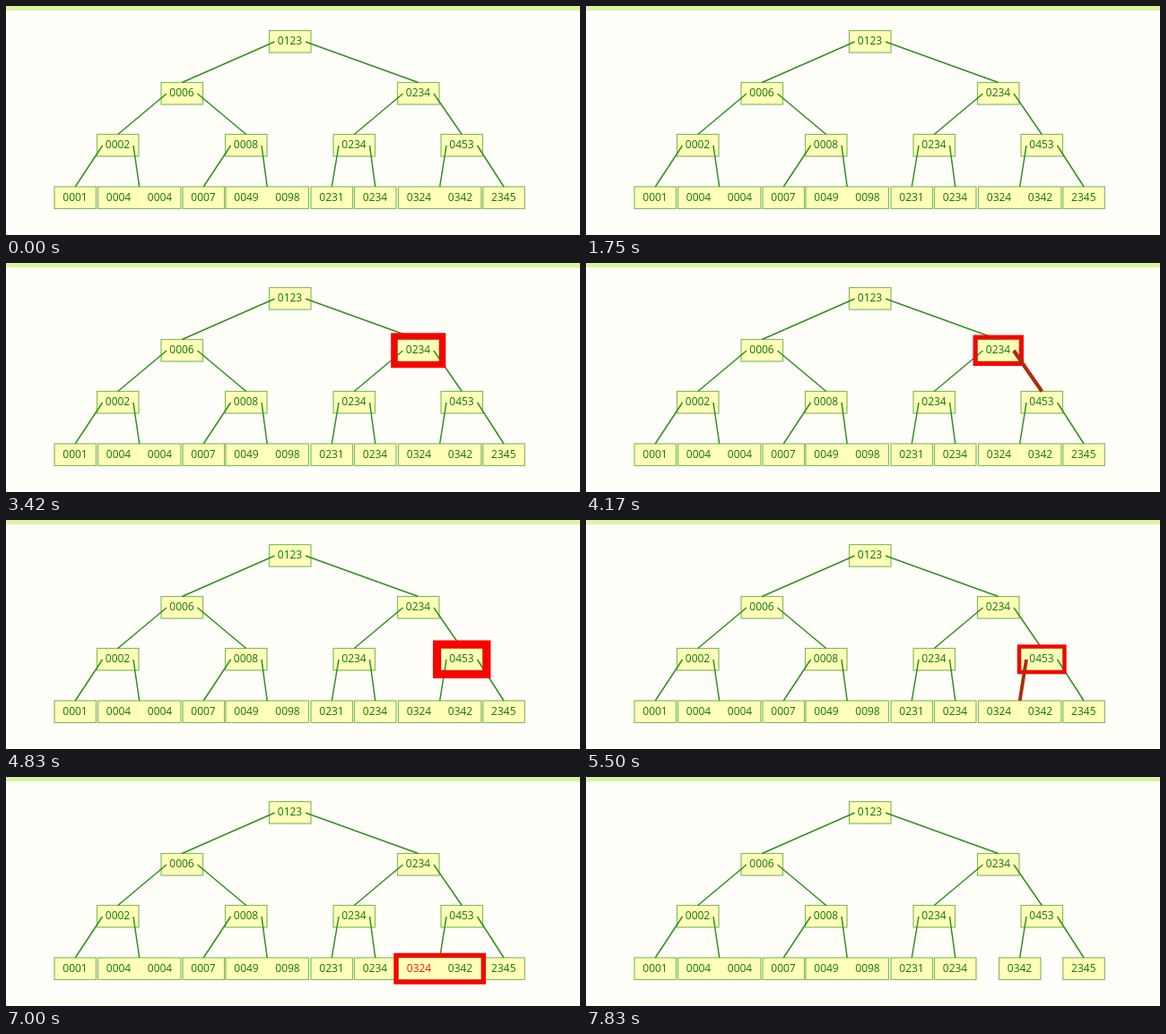
Write an HTML page with a canvas that moves like this. It is 640x256 px and loops after 8000 ms.

```html
<!DOCTYPE html>
<html lang="en">
<head>
<meta charset="utf-8">
<title>Tree search and delete</title>
<style>
html, body { margin: 0; width: 100%; height: 100%; overflow: hidden; background: #fffef9; }
canvas { display: block; }
</style>
</head>
<body>
<canvas id="stage" width="640" height="256"></canvas>
<script>
const ctx = document.getElementById('stage').getContext('2d');
const LOOP = 8000;
const START = 1900, STEP = 695;          // two steps for each visited node
const PULSE = 1640, THINNEST = 2322;     // the frame breathes on one shared clock
const H = 24.5;

const node = (x, y, keys, left, right) =>
  ({ x, y, keys, w: keys.length > 1 ? 92.4 : 46.5, left, right });
const leaf = (x, ...keys) => node(x, 202, keys);

const found = leaf(437.5, '0324', '0342');
const rest = leaf(460.5, '0342');
const low = node(485, 143.5, ['0453'], found, leaf(531.8, '2345'));
const mid = node(436.5, 85.5, ['0234'],
  node(365, 143.5, ['0234'], leaf(340, '0231'), leaf(388.5, '0234')), low);
const root = node(293.5, 27.5, ['0123'],
  node(173, 85.5, ['0006'],
    node(101.5, 143.5, ['0002'], leaf(54, '0001'), leaf(102.5, '0004', '0004')),
    node(244.5, 143.5, ['0008'], leaf(197, '0007'), leaf(245, '0049', '0098'))),
  mid);

// Each visited node with the side taken from it
const path = [[root, 'right'], [mid, 'right'], [low, 'left'], [found, null]];

function drawEdge(n, side, color = '#328e1c', width = 1.5) {
  const child = n[side];
  ctx.strokeStyle = color;
  ctx.lineWidth = width;
  ctx.beginPath();
  ctx.moveTo(side === 'left' ? n.x + 6 : n.x + n.w - 6, n.y + 12.5);
  ctx.lineTo(child.x + child.w / 2, child.y);
  ctx.stroke();
}

function drawNode(n, marked) {
  ctx.fillStyle = '#ffffb9';
  ctx.fillRect(n.x, n.y, n.w, H);
  ctx.strokeStyle = '#83bd62';
  ctx.lineWidth = 1.2;
  ctx.strokeRect(n.x, n.y, n.w, H);
  n.keys.forEach((key, i) => {
    ctx.fillStyle = marked && i === 0 ? '#f01808' : '#127608';
    ctx.fillText(key, n.x + 23 + i * 46, n.y + 15.8);
  });
}

function drawTree(n, step) {
  const removed = step >= 2 * path.length;
  drawNode(n === found && removed ? rest : n, n === found && step === 7);
  for (const side of ['left', 'right']) {
    if (!n[side]) continue;
    drawTree(n[side], step);
    drawEdge(n, side);
  }
}

function drawMark(n, side, t) {
  const turn = (t - THINNEST) / PULSE;
  const swell = 2 * Math.abs(turn - Math.round(turn));
  const out = 3.5 + 5.8 * swell;
  ctx.fillStyle = '#f80400';
  ctx.beginPath();
  ctx.rect(n.x - out, n.y - out, n.w + 2 * out, H + 2 * out);
  ctx.rect(n.x, n.y, n.w, H);
  ctx.fill('evenodd');
  if (!side) return;
  drawEdge(n, side, '#d01405', 3.5 + 2.3 * swell);
  drawEdge(n, side, '#7a4a10');
}

function draw(now) {
  const t = now % LOOP;
  const step = Math.floor((t - START) / STEP);
  const visit = path[Math.floor(step / 2)];
  ctx.fillStyle = '#fffef9';
  ctx.fillRect(0, 0, 640, 256);
  ctx.fillStyle = '#d8f5a2';
  ctx.fillRect(0, 0, 640, 5);
  ctx.font = '12px "Open Sans", "Noto Sans", sans-serif';
  ctx.textAlign = 'center';
  drawTree(root, step);
  if (visit) drawMark(visit[0], step % 2 ? visit[1] : null, t);
  requestAnimationFrame(draw);
}
requestAnimationFrame(draw);
</script>
</body>
</html>
```
